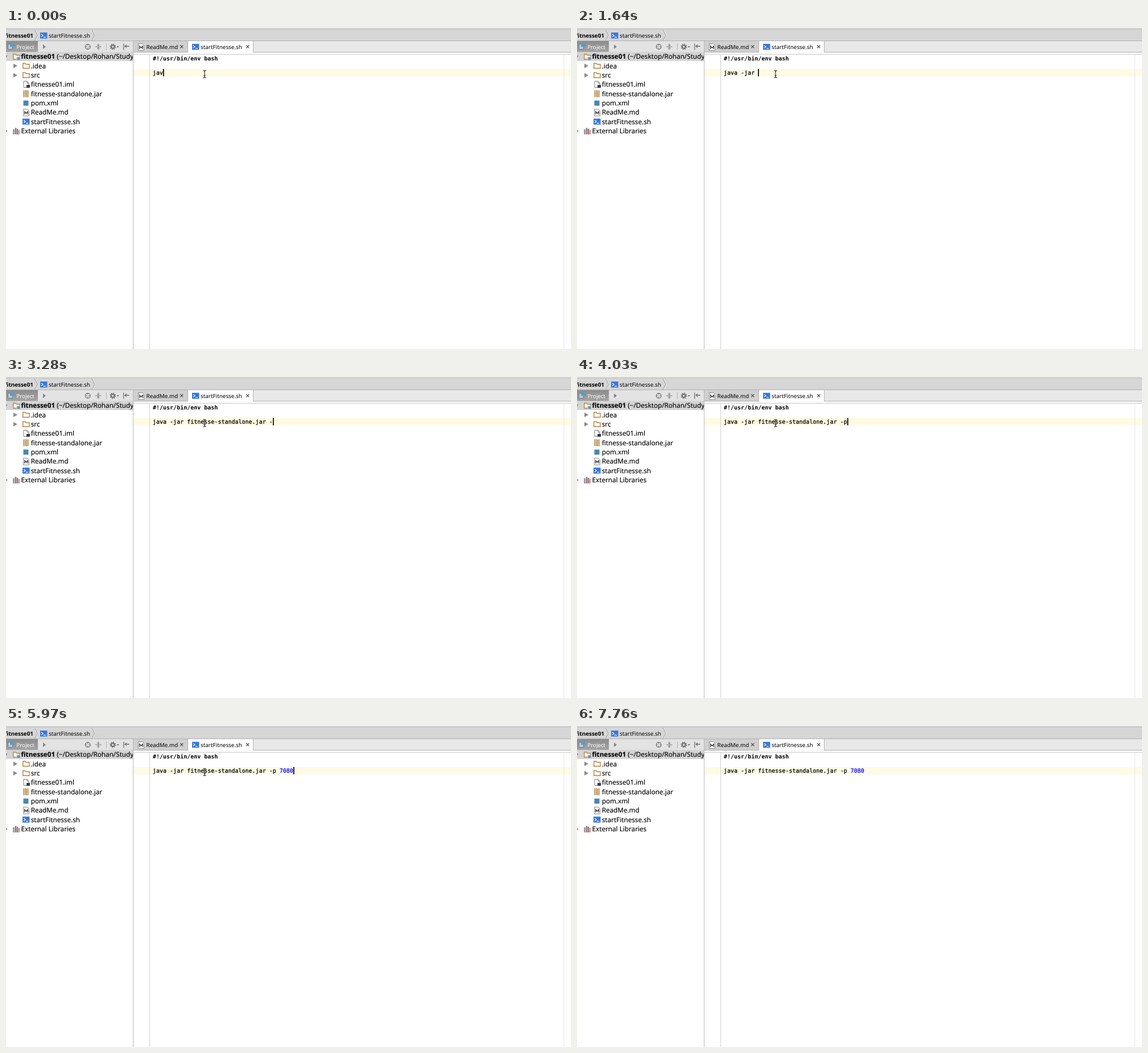
An HTML page that plays this animation: 993x564 px, repeating every 8 s.

```html
<!DOCTYPE html>
<html lang="en">
<head>
<meta charset="utf-8">
<title>Editor typing</title>
<style>
html, body { margin: 0; width: 100%; height: 100%; overflow: hidden; background: #fff; }
svg { display: block; width: 993px; height: 564px; }
text { font-family: "Noto Sans", "Open Sans", sans-serif; text-rendering: geometricPrecision; white-space: pre; fill: #000; }
.tree text { font-size: 11.7px; stroke: #000; stroke-width: .12px; }
.small { font-size: 9.9px; }
.bold { font-weight: 700; }
.code { font: 10px "DejaVu Sans Mono", monospace; stroke: #000; stroke-width: .25px; }
.code.bold { font-weight: 700; stroke: none; }
.code .num { fill: #00f; stroke: #00f; }
.line { fill: none; stroke: #6e6e6e; }
</style>
</head>
<body>
<svg viewBox="0 0 993 564">
  <defs>
    <linearGradient id="tabShade" x2="0" y2="1">
      <stop stop-color="#8d8d8d"/><stop offset="1" stop-color="#a3a3a3"/>
    </linearGradient>
    <clipPath id="side"><path d="M0 42H223V564H0z"/></clipPath>
    <g id="shell">
      <path d="M0 0H12.5V10.5H0z" fill="#3a78d8"/>
      <path d="M2 2.8L5 5.2L2 7.6M6 8.2H10" fill="none" stroke="#fff" stroke-width="1.2"/>
    </g>
    <g id="folder" fill="none" stroke="#b9824a" stroke-width="1.4">
      <path d="M.7 9.8V1H5L6.3 2.8H12V9.8z" fill="#fdf8f0"/>
    </g>
    <g id="md">
      <path d="M.5 .5H7.5L10.5 3.5V12.5H.5z" fill="#fff" stroke="#8a8a8a"/>
      <path d="M2.8 10V4.8L5.5 8L8.2 4.8V10" fill="none" stroke="#333" stroke-width="1.3"/>
    </g>
    <path id="close" d="M0 0L5 5M5 0L0 5" stroke="#555" stroke-width="1.3"/>
    <path id="closed" d="M0 0L7 4L0 8z" fill="#8a8a8a"/>
    <g id="chevron" fill="none">
      <path d="M1 0L6 10L1 19" stroke="#f2f2f2"/>
      <path d="M0 0L5 10L0 19" stroke="#999"/>
    </g>
  </defs>

  <!-- breadcrumb bar -->
  <path d="M0 0H993V2H0z" fill="#ececec"/>
  <path d="M0 2H993V23H0z" fill="#d6d6d6"/>
  <path d="M0 23H223V42H0z" fill="#e3e3e3"/>
  <path d="M0 1.5H993" stroke="#b4b4b4"/>
  <path d="M0 22.5H993" stroke="#b0b0b0"/>
  <text class="small bold" x="48" y="16.5" text-anchor="end">fitnesse01</text>
  <use href="#chevron" x="50.5" y="3"/>
  <use href="#shell" x="60" y="8"/>
  <text class="small" x="75" y="16.5">startFitnesse.sh</text>
  <use href="#chevron" x="151" y="3"/>

  <!-- project panel header -->
  <path d="M0 23H56V42H0z" fill="url(#tabShade)"/>
  <path d="M3.5 28.5H11.5V37.5H3.5z" fill="#b9c9d6" stroke="#69798a"/>
  <path d="M7 27H15V33H7z" fill="#5d9bc4"/>
  <text x="18.5" y="36.5" font-size="9.6" style="fill:#fff">Project</text>
  <path d="M65 29L70 33L65 37z" fill="#858585"/>
  <g class="line">
    <circle cx="143.7" cy="33" r="4.3" stroke-width="1.2"/>
    <path d="M143.7 28V31.5M143.7 34.5V38M138.7 33H142.2M145.2 33H148.7"/>
    <path d="M157 33H167.5M162.2 27.5V31.5M160 29.5L162.2 31.5L164.5 29.5M162.2 38.5V34.5M160 36.5L162.2 34.5L164.5 36.5"/>
    <path d="M176.5 27V39" stroke="#b2b2b2"/>
    <circle cx="187.8" cy="33" r="2.8" stroke-width="2"/>
    <circle cx="187.8" cy="33" r="4.6" stroke-width="1.7" stroke-dasharray="1.8 1.81"/>
    <path d="M206.7 27.5V38.5M209 32H216.5M212 29.5L209 32L212 34.5" stroke-width="1.3"/>
  </g>
  <path d="M194.5 32H199L196.7 34.5z" fill="#6e6e6e"/>

  <!-- project tree -->
  <path d="M0 42H223V58H0z" fill="#d4d4d4"/>
  <g class="tree" clip-path="url(#side)">
    <path d="M0 48.5H3L0 52z" fill="#8a8a8a"/>
    <use href="#folder" x="12" y="45"/>
    <path d="M19 51H25V56.5H19z" fill="#5694c2" stroke="#d4d4d4"/>
    <text x="26.5" y="54.2"><tspan class="bold">fitnesse01</tspan> (~/Desktop/Rohan/Study</text>
    <use href="#closed" x="13" y="62.5"/>
    <use href="#folder" x="29" y="61"/>
    <use href="#closed" x="13" y="79"/>
    <use href="#folder" x="29" y="77.5"/>
    <path d="M31 93.5H37L40 96.5V104.5H31z" fill="#fff" stroke="#7c7c7c"/>
    <path d="M37 93.5V97H40" class="line"/>
    <path d="M36 100H42V105H36z" fill="#343b46"/>
    <path d="M30 109.5H40V121.5H30z" fill="#e9d3ac"/>
    <path d="M31.2 109.5V121.5M38.8 109.5V121.5" stroke="#bd9355" stroke-width="1.4"/>
    <path d="M34.2 109.5V121.5M36.2 110.5V121.5" stroke="#7b603b" stroke-width="1.2" stroke-dasharray="1.4 1"/>
    <path d="M30.5 127.5H39.5V136.5H30.5z" fill="#4787b0"/>
    <use href="#md" x="30" y="142"/>
    <use href="#shell" x="29" y="159.2"/>
    <path d="M0 179L3 181L0 183z" fill="#8a8a8a"/>
    <path d="M12 178H15V187H12zM21.5 179H24V187H21.5z" fill="#9aa0a8"/>
    <path d="M15.7 175.5H18.2V187H15.7z" fill="#777e88"/>
    <path d="M18.8 177H21V187H18.8z" fill="#d5584f"/>
    <text x="26.5" y="185.2">External Libraries</text>
    <g id="files"></g>
  </g>

  <!-- editor tabs -->
  <path d="M224 23H993V42H224z" fill="#e8e8e8"/>
  <path d="M224 23H319V42H224z" fill="#d0d0d0"/>
  <path d="M320 23H435V43H320z" fill="#fff"/>
  <path d="M224 43H993V46H224z" fill="#f8f8f8"/>
  <path d="M224 42.5H319.5V23M434.5 23V42.5H993" fill="none" stroke="#b2b2b2"/>
  <path d="M224 46.5H993" stroke="#cfcfcf"/>
  <use href="#md" x="232" y="27"/>
  <text class="small" x="246.5" y="36.5">ReadMe.md</text>
  <use href="#close" x="306.2" y="30.3"/>
  <use href="#shell" x="327" y="27.8"/>
  <text class="small" x="342" y="36.5">startFitnesse.sh</text>
  <use href="#close" x="422.2" y="30.3"/>

  <!-- editor -->
  <path d="M224 72H993V85H224z" fill="#fffae3"/>
  <path d="M252.5 47V564" stroke="#d0d0d0"/>
  <path d="M980.5 47V564" stroke="#e8e8e8"/>
  <path d="M223.5 23V564" stroke="#b8b8b8"/>
  <text class="code bold" x="258" y="56.5">#!/usr/bin/env bash</text>
  <text class="code" x="258" y="82.3"><tspan id="cmd"></tspan><tspan id="port" class="num"></tspan></text>
  <path id="caret" d="M0 72H1.7V85H0z"/>
  <path id="beam" d="M.5 .6Q3 .6 3 2.5Q3 .6 5.5 .6M3 2V12M.5 13.4Q3 13.4 3 11.5Q3 13.4 5.5 13.4M1.3 9.5H4.7"
    fill="none" stroke="#222" stroke-width="1.1"/>
</svg>
<script>
const LOOP = 8000, COMMAND = "java -jar fitnesse-standalone.jar -p 7080", PORT_AT = 37;
const FILES = [".idea", "src", "fitnesse01.iml", "fitnesse-standalone.jar", "pom.xml", "ReadMe.md", "startFitnesse.sh"];

// [time, value] steps
const typed = [[0, 3], [150, 4], [300, 5], [600, 6], [1050, 7], [1200, 8], [1340, 9], [1640, 10], [2090, 33],
  [2680, 34], [3280, 35], [4030, 36], [4480, 37], [5080, 38], [5530, 39], [5680, 40], [5970, 41]];
const blink = [[0, true], [6720, false], [7310, true], [7760, false]];
const pointer = [[0, [346, 74]], [7020, [342, 63]], [7170, [336, 60]], [7310, [545, 390]], [7460, null]];

const el = id => document.getElementById(id);
const at = (steps, t) => steps.findLast(step => step[0] <= t)[1];
const show = (node, on) => node.setAttribute("visibility", on ? "visible" : "hidden");

FILES.forEach((name, i) => {
  const label = document.createElementNS("http://www.w3.org/2000/svg", "text");
  label.setAttribute("x", 43.7);
  label.setAttribute("y", 70.6 + i * 16.35);
  label.textContent = name;
  el("files").append(label);
});

function draw(t) {
  const count = at(typed, t), spot = at(pointer, t);
  el("cmd").textContent = COMMAND.slice(0, Math.min(count, PORT_AT));
  el("port").textContent = COMMAND.slice(PORT_AT, Math.max(count, PORT_AT));
  el("caret").setAttribute("transform", `translate(${Math.round(258 + 6.02 * count)})`);
  show(el("caret"), at(blink, t));
  show(el("beam"), spot);
  if (spot) el("beam").setAttribute("transform", `translate(${spot})`);
}

const start = performance.now();
function tick() {
  draw((performance.now() - start) % LOOP);
  requestAnimationFrame(tick);
}
tick();
</script>
</body>
</html>
```
